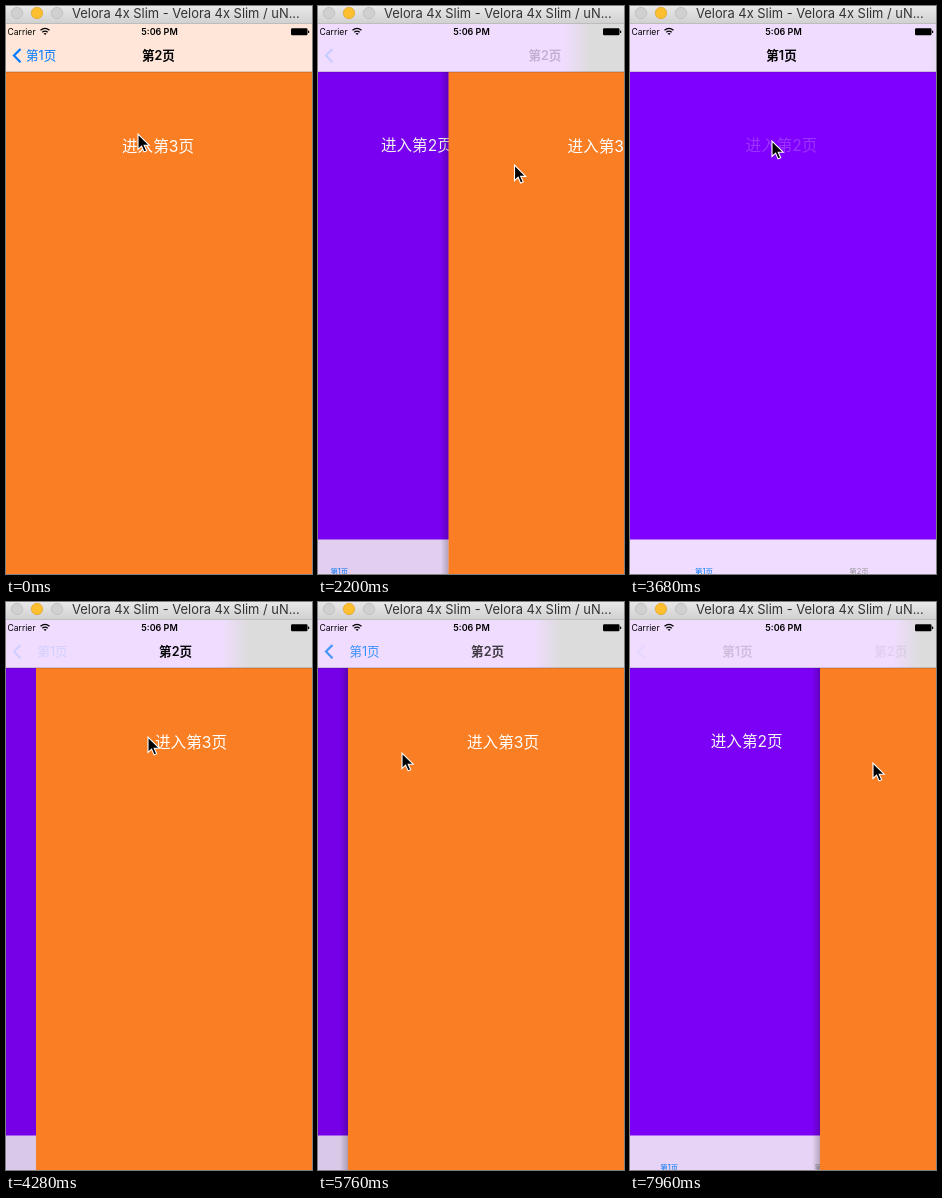
An HTML page that plays this animation: 306x568 px, repeating every 8000 ms.

```html
<!DOCTYPE html>
<html lang="zh-CN">
<head>
<meta charset="utf-8">
<title>Swipe back</title>
<style>
html, body { margin: 0; width: 100%; height: 100%; overflow: hidden; }
svg { display: block; width: 306px; height: 568px; }
text { font-family: Inter, "Noto Sans CJK SC", "Noto Sans CJK", sans-serif; }
.link { font-size: 15.6px; fill: #fff; text-anchor: middle; }
.nav { font-size: 12.56px; }
.bold { font-weight: 600; }
.tab { font-size: 7.4px; text-anchor: middle; }
</style>
</head>
<body>
<svg viewBox="0 0 306 568">
  <defs>
    <linearGradient id="chrome" x2="0" y2="1">
      <stop stop-color="#e8e8e8"/><stop offset="1" stop-color="#d0d0d0"/>
    </linearGradient>
    <linearGradient id="tint" gradientUnits="userSpaceOnUse" x1="298" x2="326">
      <stop stop-color="#f0dcff"/><stop offset="1" stop-color="#dcdcdc"/>
    </linearGradient>
    <linearGradient id="shade">
      <stop stop-opacity="0"/><stop offset="1" stop-opacity=".22"/>
    </linearGradient>
  </defs>

  <g id="page1">
    <rect y="66" width="306" height="468" fill="#8000ff"/>
    <rect y="533.5" width="306" height="35" fill="#f0dcff"/>
    <text id="link1" class="link" x="151.5" y="145">进入第2页</text>
    <text class="tab" x="74" y="568" fill="#007aff">第1页</text>
    <text class="tab" x="229" y="568" fill="#929292">第2页</text>
  </g>
  <rect id="dim" y="66" width="306" height="502"/>
  <g id="page2">
    <rect id="shadow" x="-8" y="66" width="8" height="502" fill="url(#shade)"/>
    <rect y="66" width="306" height="502" fill="#fa7e24"/>
    <text id="link2" class="link" x="152" y="146">进入第3页</text>
  </g>

  <rect id="bar" y="18" width="306" height="48" fill="#ffe6d9"/>
  <g id="blur"><rect x="-10" y="18" width="450" height="48" fill="url(#tint)"/></g>
  <rect y="65.5" width="306" height=".8" opacity=".3"/>
  <path id="chevron" d="M14.5 43 8 49.6l6.500 6.600" fill="none" stroke="#007aff" stroke-width="2.2"/>
  <g id="back">
    <text id="backBlue" class="nav" x="20" y="54" fill="#007aff">第1页</text>
    <text id="title1" class="nav bold" x="20" y="54">第1页</text>
  </g>
  <text id="title2" class="nav bold" x="136" y="54">第2页</text>

  <text x="1.500" y="29" font-size="8.600">Carrier</text>
  <g fill="none" stroke="#000" stroke-width="1.300">
    <path d="M34.500 24.300q4.500-3.800 9 0M36.300 26.200q2.700-2.200 5.400 0"/>
  </g>
  <path d="M37.600 27.400q1.500-1 3 0l-1.500 1.700z"/>
  <text class="bold" x="153.500" y="29" font-size="9" text-anchor="middle">5:06 PM</text>
  <rect x="285" y="22.300" width="16.500" height="7" rx="1.200"/>
  <rect x="302" y="24.500" width="1.200" height="2.600" rx=".5"/>

  <rect width="306" height="18" fill="url(#chrome)"/>
  <rect y="17.300" width="306" height=".7" fill="#b5b5b5"/>
  <g fill="#d0d0d0" stroke="#b9b9b9" stroke-width=".7">
    <circle cx="11" cy="7" r="5.700"/>
    <circle cx="31" cy="7" r="5.700" fill="#fdbe2f" stroke="#e0a32a"/>
    <circle cx="51" cy="7" r="5.700"/>
  </g>
  <text x="66" y="12" font-size="12.900" fill="#333">Velora 4x Slim - Velora 4x Slim / uN...</text>

  <path id="cursor" d="M0 0v15.500l3.600-3.400 2.500 5.800 2.600-1.100-2.500-5.600h5z" stroke="#fff" stroke-width="1.100"/>
</svg>
<script>
const LOOP = 8000, STEP = 147.4, LEAD = 16, W = 306;
const $ = id => document.getElementById(id);

// [step, left edge of page 2]
const slide = [[0, 0], [4, 0], [10, 68], [16, 143], [17, 250], [18, W], [27, W],
  [28, 170], [29, 30], [30, 4], [31, 0], [35, 0], [39, 30], [43, 93], [46, 117],
  [50, 173], [51, 173], [54, 190]];
// [step, x, y] of the pointer
const pointer = [[0, 132, 128], [4, 66, 150], [10, 134, 155], [16, 209, 160],
  [17, 290, 162], [20, 300, 160], [21, 264, 148], [24, 142, 135], [29, 142, 135],
  [34, 54, 148], [35, 54, 148], [39, 84, 151], [43, 148, 155], [46, 173, 158],
  [50, 226, 160], [51, 226, 160], [54, 243, 161]];

function at(keys, k, col) {
  const i = keys.findIndex(key => key[0] >= k);
  if (i < 0) return keys[keys.length - 1][col];
  if (i === 0) return keys[0][col];
  const a = keys[i - 1], b = keys[i];
  return a[col] + (b[col] - a[col]) * (k - a[0]) / (b[0] - a[0]);
}
const move = (id, x, y = 0) => $(id).setAttribute("transform", `translate(${x} ${y})`);
const fade = (id, a) => $(id).setAttribute("opacity", a);

function draw(now) {
  const k = Math.min(54, Math.floor((now % LOOP + LEAD) / STEP));
  const x = at(slide, k, 1), p = x / W;
  const pushing = k >= 28 && k <= 30;
  const shift = 0.3 * (x - W);

  move("page1", shift);
  fade("dim", 0.1 * (1 - p));
  fade("link1", k >= 25 && k <= 27 ? 0.2 : 1);
  move("page2", x);
  fade("shadow", pushing || k >= 19 && k <= 27 ? 0 : 1);
  move("link2", Math.min(x, 3));

  move("blur", shift);
  fade("blur", x > 0 ? 1 : 0);
  move("back", 0.38 * x);
  move("title2", 0.57 * x);
  fade("title2", p < 1 ? (1 - p) ** (pushing ? 0.3 : 3) : 0);
  fade("chevron", (1 - p) ** (pushing ? 20 : 3.2));
  fade("backBlue", pushing ? (1 - p) ** 20 : Math.max(0, 1 - 2.4 * p));
  fade("title1", Math.max(0, (p - 0.4) / 0.6) ** 2);

  move("cursor", at(pointer, k, 1), at(pointer, k, 2));
  fade("cursor", k >= 18 && k <= 20 ? 0 : 1);
}

const start = performance.now();
function tick() {
  draw(performance.now() - start);
  requestAnimationFrame(tick);
}
tick();
</script>
</body>
</html>
```
